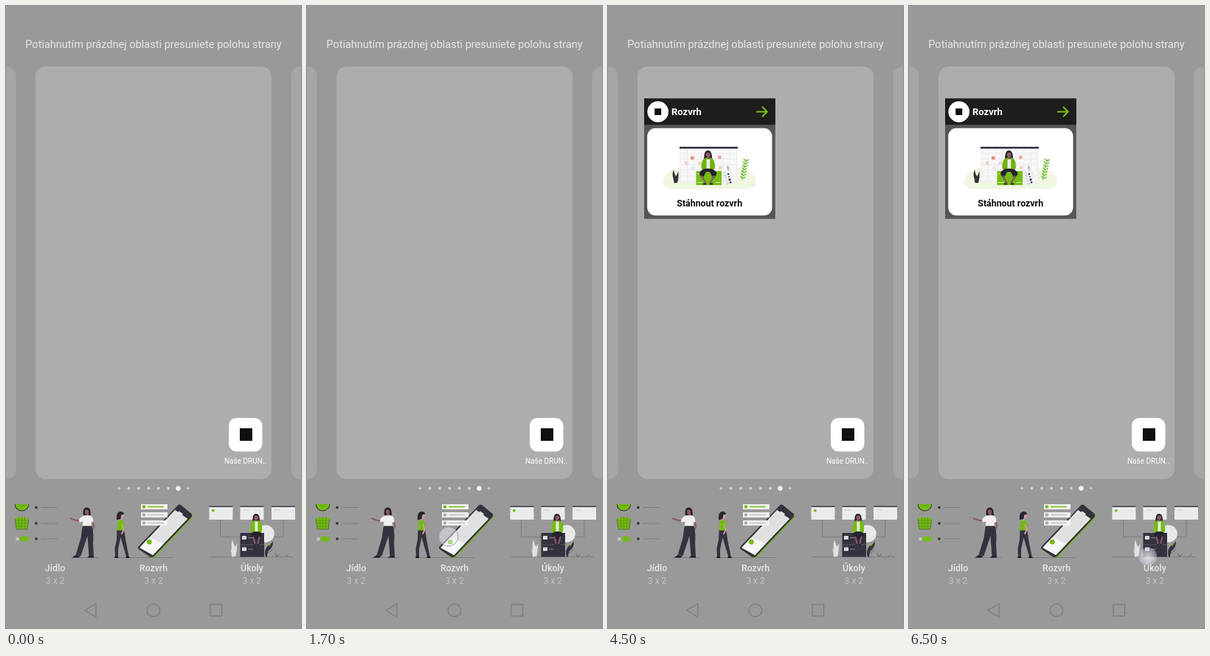
An HTML page for the animation above (8 s loop, 400 px wide and 844 px high).

```html
<!DOCTYPE html>
<html lang="sk">
<head>
<meta charset="utf-8">
<title>Widget placement</title>
<style>
html, body { margin: 0; width: 100%; height: 100%; overflow: hidden; background: #999; }
svg { display: block; width: 100%; height: 100%; }
text { font-family: Roboto, sans-serif; text-anchor: middle; }
.left { text-anchor: start; }
.name { font-size: 12.3px; font-weight: 500; fill: #e6e6e6; }
.size { font-size: 11.9px; fill: #c4c4c4; }
.nav { fill: none; stroke: #7b7b7b; stroke-width: 1.2; }
.floor { fill: none; stroke: #6b6b70; stroke-width: .6; }
.ghost { fill: none; stroke: #bcbcbc; stroke-width: 1.2; stroke-linejoin: round; }
</style>
</head>
<body>
<svg viewBox="0 0 400 844" preserveAspectRatio="none">
  <defs>
    <linearGradient id="shade" x2="0" y2="1">
      <stop offset="0" stop-color="#484848"/>
      <stop offset=".25" stop-color="#5c5c5c"/>
      <stop offset=".7" stop-color="#858585"/>
      <stop offset="1" stop-color="#999"/>
    </linearGradient>
    <radialGradient id="glow">
      <stop offset="0" stop-color="#fff" stop-opacity=".75"/>
      <stop offset=".6" stop-color="#e6e6f0" stop-opacity=".6"/>
      <stop offset="1" stop-color="#c4c4d8" stop-opacity=".45"/>
    </radialGradient>
    <g id="schedule"></g>
  </defs>

  <rect width="400" height="844" fill="#999"/>
  <g fill="#a6a6a6">
    <rect x="-40" y="82" width="53.5" height="560" rx="13"/>
    <rect x="386.5" y="82" width="54" height="560" rx="13"/>
  </g>
  <rect x="40" y="82" width="320" height="560" rx="14" fill="#adadad"/>

  <text id="hint" x="200" y="56.5" font-size="14.54" fill="#e6e6e6">Potiahnutím prázdnej oblasti presuniete polohu strany</text>

  <g id="remove">
    <rect width="400" height="44" fill="url(#shade)"/>
    <g fill="none" stroke="#fff" stroke-width="1.3">
      <circle cx="298.2" cy="22.5" r="8"/>
      <path d="M294 22.5h8.4"/>
    </g>
    <text class="left" x="317" y="27.6" font-size="14.5" fill="#fff">Odstrániť</text>
  </g>

  <rect x="302" y="559" width="45.5" height="45.5" rx="10.5" fill="#fff"/>
  <rect x="317" y="573" width="17" height="17" fill="#101010"/>
  <text x="324.5" y="620.6" font-size="10" fill="#fff">Naše DRUN..</text>

  <g id="dots" fill="#d6d6d6"></g>
  <g id="food"></g>
  <use href="#schedule"/>
  <g id="tasks"></g>
  <g id="labels"></g>

  <g class="nav">
    <path d="M107 820L122 811V829.5Z"/>
    <circle cx="200" cy="820" r="8.7"/>
    <rect x="277" y="812" width="15.6" height="15.8"/>
  </g>

  <g id="drag">
    <g id="ghost" transform="translate(54 149) scale(1.575) translate(-147 -676)"></g>
    <use href="#schedule" opacity=".94" transform="translate(78.5 161) scale(1.12) translate(-147 -676)"/>
  </g>
  <g id="widget"></g>
  <circle id="touch"/>
</svg>
<script>
const INK = '#34323f', GREEN = '#74bb12', SKIN = '#8c5960', PINK = '#d99aa0';
const $ = id => document.getElementById(id);
const rect = (x, y, w, h, fill, rx = 0) =>
  `<rect x="${x}" y="${y}" width="${w}" height="${h}" rx="${rx}" fill="${fill}"/>`;
const dot = (x, y, r, fill) => `<circle cx="${x}" cy="${y}" r="${r}" fill="${fill}"/>`;
const path = (d, fill) => `<path d="${d}" fill="${fill}"/>`;
const line = (d, stroke, width) =>
  `<path d="${d}" fill="none" stroke="${stroke}" stroke-width="${width}" stroke-linecap="round" stroke-linejoin="round"/>`;
const floor = d => `<path class="floor" d="${d}"/>`;
const repeat = (n, make) => Array.from({ length: n }, (_, i) => make(i)).join('');

function food() {
  const bullets = [680.5, 702, 723].map(y =>
    rect(39.3, y - 1.6, 3.2, 3.2, INK) + floor(`M47.5 ${y}H70`)).join('');
  const grid = 'M12.5 698H30M13 702H29.5M13.5 706H29M17.5 694V710M21.5 694V710M25.5 694V710';
  return bullets +
    path('M11.6 676H31.2A9.8 9.6 0 0 1 11.6 676Z', INK) +
    path('M12.6 676H30.4A8.9 8.6 0 0 1 12.6 676Z', GREEN) +
    line('M17.5 676.5Q21.5 681 25.7 676.5', '#4e8d10', .7) +
    path('M12 696Q13 693.5 15 694H28Q31 694 30.5 698L29 710H14Z', GREEN) +
    line(grid, '#4b7a1a', .5) + line('M12 696L14 710H29L30.5 697', INK, .5) +
    path('M17 723Q23 716.5 28 721L31.5 720 30 723.5 32 727 27 725.5Q22 729 17 723Z', GREEN) +
    path('M12.5 720.5L18 722V724.5L12.5 726 14 723Z', '#c5c5c5') +
    floor('M88 748.5H125') +
    path('M104.5 689Q104 680.5 109.5 680.5Q115 680.5 114.8 689L115.5 693H106Z', '#25232d') +
    path('M107 684.5Q109 682.5 112 685L111.8 689.5 113 692.5H108L108.5 689.5Q106.5 688 107 684.5Z', SKIN) +
    line('M103.5 696.5L97 698.5 88 695.5M117 698L119.3 706 116 713', SKIN, 2.1) +
    path('M106.5 691.3L114 691.2Q118 692 118.5 700L115.5 701 116 707H103.5L104.5 699.5 99.5 700.5 99 696.5Q103 692 106.5 691.3Z', '#f0f0f0') +
    path('M103.8 705.5H116.5Q119.5 717 118 729L119 747H112.5L110.5 719 101.5 746 94.5 745 101.5 722Z', INK) +
    path('M94.5 745L101 746.5 98 748.5H89.5ZM112.5 746.5H119V748.5H109.5Z', '#1d1c24');
}

const PHONE = 'M233 677.5Q235 675.5 237.5 677.5L251 688.5Q253.5 691 251 694L200.5 747Q198 749 195 747.5L180 737Q178 735.5 180 733Z';
const WALKER = 'M151 692Q150 686 155 686Q160 686 160 691L158.5 697Q162.5 701 161 712Q160 718 162 726L166.5 747 163 749 157.5 741 155.5 728 151.5 737V748.5H147.5L147.5 737 151 724 150 712Q148.5 703 152 698Z';

function schedule() {
  const row = (y, i) => rect(183, y, 36, 7, '#f0f0f0', .5) +
    dot(187, y + 3.5, 2.2, i ? '#aaa' : GREEN) +
    rect(192, y + 2.5, 22, 2, i ? '#c9c9c9' : '#8cc63c', 1);
  return floor('M147 748.5H227') +
    path('M150.5 711H160Q161.5 717 162 724L166.5 746 163.5 748.5 158 730 155.5 721 152 737V748H148L147.5 736 150 724Z', INK) +
    path('M150.5 711.5L151.5 700Q153 696.8 156.5 697Q160.5 699 160.5 705L160 711.5Z', GREEN) +
    line('M157.5 704L159.5 711 157 716', PINK, 1.8) +
    path('M153.5 688Q158.5 685.5 159.8 690L158.7 695H157L156.5 698H153.5Z', PINK) +
    path('M150 697.5Q149 686.5 154.5 686Q160 685.5 160 689.5L156.3 690.5 155.5 696 152 697Z', '#282630') +
    path('M147.3 747H151.8L152.5 749H147.3ZM163 746.5H166.5L168 749H162Z', '#1d1c24') +
    `<g transform="translate(1 1)">${path(PHONE, GREEN)}</g>` + path(PHONE, INK) +
    path('M229.2 683.8L233.5 686.8 235 685.5 240 689.3 239 690.8 246.3 695.8 199.2 745 181.3 735Z', '#e0e0e0') +
    path('M194 721.2L214 729.5 199.2 745 181.3 735Z', '#f6f6f6') +
    line('M196.5 721L228 687.5M214.5 727.5L243 697.5', '#f2f2f2', .8) +
    dot(194.3, 727.2, 3.4, GREEN) +
    [676, 687, 698].map(row).join('');
}

function tasks() {
  const win = (x, i) => rect(x, 679, 32, 18, '#ebebeb') + rect(x, 678.5, 32, 1.4, INK) +
    (i ? rect(x + 4, 683.2, 8, 1.2, '#d2d2d2') : dot(x + 5.3, 684.6, 1.9, GREEN));
  const mail = y => rect(320, y, 6, 4.8, '#eee') + line(`M320.3 ${y + .4}L323 ${y + 2.5} 325.7 ${y + .4}`, '#777', .5) +
    rect(328, y + 2, 7, 1.2, '#747282');
  return floor('M276 747.5H389M290.5 697V720.5H317M376 697V720.5H350') +
    [275.5, 317.5, 360].map(win).join('') +
    dot(352, 716, 11.8, '#e8e8e8') +
    rect(317.5, 715, 32.5, 32.5, INK) + rect(317.5, 730.5, 32.5, .8, '#625f70') +
    mail(719) + mail(734.5) +
    path('M310 747.5Q303 737 307 724Q309 733 311 734L313.5 729Q313 740 311 747.5ZM306 747.5Q306 740 303.5 736Q309 741 309 747.5Z', '#e2e2e2') +
    path('M352 747.5Q349 738 355.5 732Q359 731 362 726Q362 736 356 739Q354 743 354 747.5Z', INK) +
    line('M355 743L361 738M367 747.5L365 743M367 747.5L370 744M380 747L383 744', '#5d5b67', .8) +
    dot(357, 731, 1.5, GREEN) +
    path('M334.7 704Q333 688.5 339 689Q345 688.5 344 704Z', '#24222b') +
    dot(339.3, 694.2, 2.9, SKIN) + rect(337.8, 695.5, 3, 5, SKIN) +
    path('M335.5 698.5L338 698 339.5 702 341.5 698 344.5 699Q348 702 347 713L345 716H334L331.5 712Q331 701 335.5 698.5Z', GREEN) +
    path('M337.5 699.5L341.5 699.5 341.5 713H337.5Z', '#e6eadf') +
    path('M332 717Q333 713 339.5 713Q346 713 347 717L343 723H336Z', '#24222b') +
    line('M335.5 720.5L337.5 729M343.5 720.5L341.5 729', SKIN, 2) +
    line('M336.5 731H338.5M340.5 731H342.5', '#24222b', 1.5);
}

function widget() {
  const grid = line(repeat(9, i => `M${98 + i * 9.6} 194V239`) + repeat(6, i => `M98 ${200 + i * 7.6}H175`), '#dedee2', .5);
  const cells = [[112, 204, '#e58b78'], [104, 211, '#f1d3bd'], [122, 211, '#f1d3bd'], [139, 210, '#f1d3bd'],
    [149, 203, '#eba899'], [150, 217, '#f1d3bd'], [113, 218, '#e9e9ec']]
    .map(([x, y, c]) => rect(x, y, 4.5, 4.5, c)).join('');
  const fern = repeat(7, i => {
    const x = 182.5 + i * .75, y = 234 - i * 3.9;
    return line(`M${x} ${y}l-2.6 -2.8M${x} ${y}l3.4 -1.8`, '#7dc14a', 1.7);
  });
  const pebbles = repeat(9, i => dot(158 + (i * 5 % 9), 226 + i * 1.9, .9 + i % 3 * .35, i % 2 ? INK : '#cfcfd6'));
  return rect(49, 125.5, 177.8, 163.3, '#555') + rect(49, 125.5, 177.8, 35.7, '#1d1d1d') +
    dot(67.7, 143.5, 14.3, '#fff') + rect(63.2, 139, 9, 9, '#101010') +
    '<text class="left" x="86" y="148.2" font-size="13" font-weight="700" fill="#fff">Rozvrh</text>' +
    '<path d="M201 143.5H215.5M209 136.8L215.8 143.5 209 150.2" fill="none" stroke="#7abf12" stroke-width="2"/>' +
    rect(53.2, 165.8, 169.3, 118.4, '#fff', 11) +
    path('M75 241Q74 230 85 224Q97 217 109 222Q130 229 153 223Q178 215 194 226Q203 233 200 243Q197 250 170 248L89 248.5Q76 248 75 241Z', '#eff6e1') +
    rect(98, 193, 77.5, 46, '#f7f7f9') + rect(97, 191, 79, 2.6, INK) + grid + cells +
    path('M92 240Q85 231 89 222Q90.5 230 92.5 231L95.5 224Q96 234 94 240ZM89.5 240Q88.5 233 87.5 230L92 240Z', INK) +
    fern + line('M181.5 236Q183 220 188 208', '#7dc14a', .8) +
    rect(155, 224, 14, 18, '#f0f0f2') + pebbles + path('M163 224Q160 219 162 216Q166 220 163 224Z', '#b7b7bd') +
    rect(119.5, 224, 34.5, 19, GREEN) + line('M121.5 239.5H128M146 239.5H152M121.5 228H126', '#d7efb4', 1) +
    path('M130.5 212Q129 196 135.5 196Q142 196 141 212Z', '#24222b') +
    dot(135.7, 201.8, 3.1, SKIN) + rect(134, 203, 3.4, 5, SKIN) +
    path('M131.5 206.5L134 205.5 136 210 138 205.5 141 206.5Q145.5 210 144.8 220L142 224H129.5L126.5 220Q126 209 131.5 206.5Z', '#6eb20e') +
    path('M133.5 208H138.3V222H133.5Z', '#e9eddf') +
    path('M124 228Q125 220.5 135.5 220.5Q146 220.5 147.5 228L143 234.5 138 225H133L128 234.5Z', '#24222b') +
    line('M127.5 231L132 239.5M143.5 231L139 239.5', SKIN, 2.4) +
    line('M129.5 241.5H132.5M138.5 241.5H141.5', '#24222b', 2) +
    '<text x="137.7" y="272" font-size="12.4" font-weight="700" fill="#0c0c0c">Stáhnout rozvrh</text>';
}

function pageDots(gap) {
  return repeat(8, i => {
    const x = 200 + (i - 3.5) * gap;
    if (i === 0 || i === 7) return line(`M${x - 1.7} 654.5h3.4M${x} 652.8v3.4`, '#d6d6d6', 1.1);
    return i === 6 ? dot(x, 654.5, 3.2, '#f4f4f4') : dot(x, 654.5, 1.9, '#d0d0d0');
  });
}

$('food').innerHTML = food();
$('schedule').innerHTML = schedule();
$('tasks').innerHTML = tasks();
$('widget').innerHTML = widget();
$('ghost').innerHTML = [WALKER, PHONE, 'M183 676h36v7h-36ZM183 687h36v7h-36ZM183 698h32M147 748.5H227']
  .map(d => `<path class="ghost" d="${d}"/>`).join('');
$('labels').innerHTML = ['Jídlo', 'Rozvrh', 'Úkoly'].map((name, i) => {
  const x = 66.6 + i * 133.4;
  return `<text class="name" x="${x}" y="767.4">${name}</text><text class="size" x="${x}" y="783.5">3 x 2</text>`;
}).join('');

const touches = {
  press: { cx: 192, cy: 720, r: 13, fill: '#f2f2f8', 'fill-opacity': .5, stroke: '#a3a3c4' },
  carry: { cx: 124, cy: 219, r: 12.5, fill: '#f2f2f8', 'fill-opacity': .4, stroke: '#9090c0' },
  next: { cx: 324, cy: 747, r: 12.3, fill: 'url(#glow)', 'fill-opacity': 1, stroke: 'none' }
};
const steps = [
  { until: 500 },
  { until: 2500, touch: 'press' },
  { until: 4500, touch: 'carry', drag: true },
  { until: 6500, widget: true },
  { until: 8000, touch: 'next', widget: true }
];
const show = (id, on) => { $(id).style.display = on ? '' : 'none'; };
let current;

function render(time) {
  const step = steps.find(s => time < s.until);
  if (step === current) return;
  current = step;
  show('hint', !step.drag);
  show('remove', step.drag);
  show('drag', step.drag);
  show('widget', step.widget);
  show('touch', step.touch);
  $('dots').innerHTML = pageDots(step.drag ? 40 : 13.37);
  for (const [key, value] of Object.entries(touches[step.touch] || {})) $('touch').setAttribute(key, value);
}

function tick() {
  render(performance.now() % 8000);
  requestAnimationFrame(tick);
}
tick();
</script>
</body>
</html>
```
